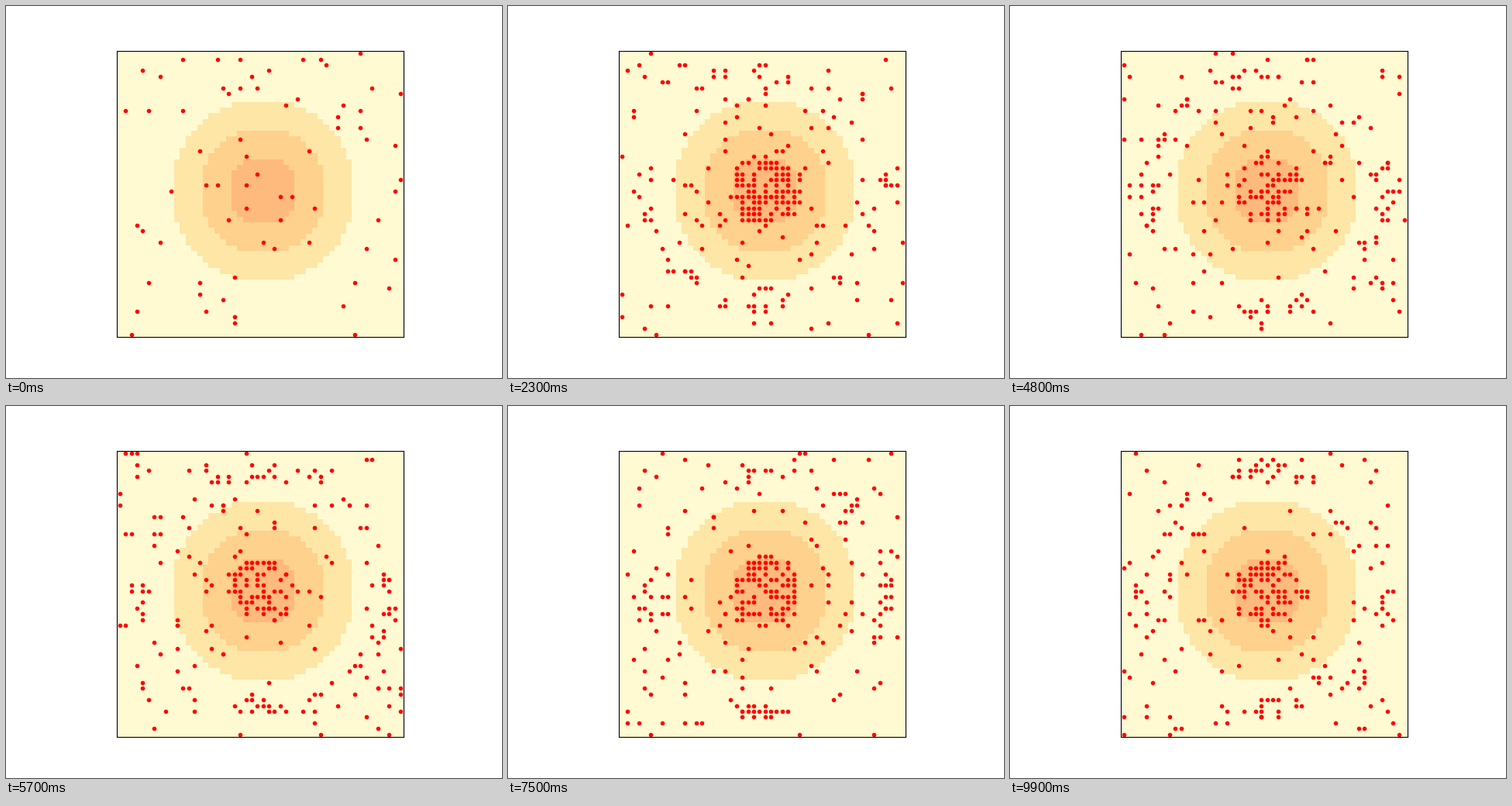
Animation of 640x480 px, one loop 10 s. Source, as a matplotlib script:

```python
import matplotlib.pyplot as plt
import numpy as np
from matplotlib.animation import FuncAnimation
from matplotlib.colors import ListedColormap

SIZE = 50
FRAMES = 100
START, WANDERERS = 69, 132
CORE, RING = 62, 56
TURNOVER = 0.14

rng = np.random.default_rng(11)
rows, cols = np.indices((SIZE, SIZE))
dx, dy = cols - 25, rows - 24
dist = np.hypot(dx, dy)
capacity = np.digitize(dist, [21, 16, 11, 6])

# Settled agents crowd the peak and the rim, thickest where the rim meets an axis.
core_weight = 1 / (1 + np.exp(4 * (dist - 6)))
axial = np.cos(2 * np.arctan2(dy, dx)) ** 8
rim_weight = np.exp(-((dist - 20.9) / (0.7 + 0.8 * axial)) ** 2) * (0.5 + axial)


def ramp(t, length):
    return min(t / length, 1)


def core_count(t):
    """Overshoots the sustainable number, then swings back towards it."""
    swing = 23 * np.cos(2 * np.pi * (t - 23) / 60) * np.exp(-abs(t - 23) / 60)
    return int(ramp(t, 18) * (CORE + swing))


def settle(weight, count):
    cells = rng.choice(SIZE * SIZE, count, replace=False,
                       p=weight.ravel() / weight.sum())
    return np.column_stack([cells % SIZE, cells // SIZE])


def newcomers(count):
    return settle(np.ones_like(dist), count)


def wander(cells):
    """Walk one cell along an axis; some starve and are replaced."""
    axis = rng.integers(2, size=len(cells))
    moved = cells.copy()
    moved[np.arange(len(cells)), axis] += rng.choice([-1, 1], len(cells))
    moved %= SIZE
    starved = rng.random(len(cells)) < TURNOVER
    moved[starved] = newcomers(starved.sum())
    return moved


def simulate():
    walkers = newcomers(START)
    history = [walkers]
    for t in range(1, FRAMES):
        target = int(START + (WANDERERS - START) * ramp(t, 15))
        walkers = np.vstack([wander(walkers), newcomers(target - len(walkers))])
        history.append(np.vstack([
            walkers,
            settle(core_weight, core_count(t)),
            settle(rim_weight, int(RING * ramp(t, 35))),
        ]))
    return history


history = simulate()

fig, ax = plt.subplots(figsize=(6.4, 4.8), dpi=100)
fig.subplots_adjust(left=0.125, right=0.9, bottom=0.11, top=0.88)
cmap = ListedColormap(["#fffad2", "#fffad2", "#fee6a7", "#fed18d", "#feba7c"])
ax.imshow(capacity, cmap=cmap, vmin=0, vmax=4, interpolation="none",
          extent=[0, SIZE, SIZE, 0])
ax.set(xticks=[], yticks=[])
dots, = ax.plot([], [], ".", color="red", markersize=6)
ax.set(xlim=(0, SIZE), ylim=(SIZE, 0))


def draw(i):
    dots.set_data(*(history[i] + 0.5).T)
    return dots,


anim = FuncAnimation(fig, draw, frames=FRAMES, interval=100,
                     repeat=True, repeat_delay=0)
plt.show()
```
